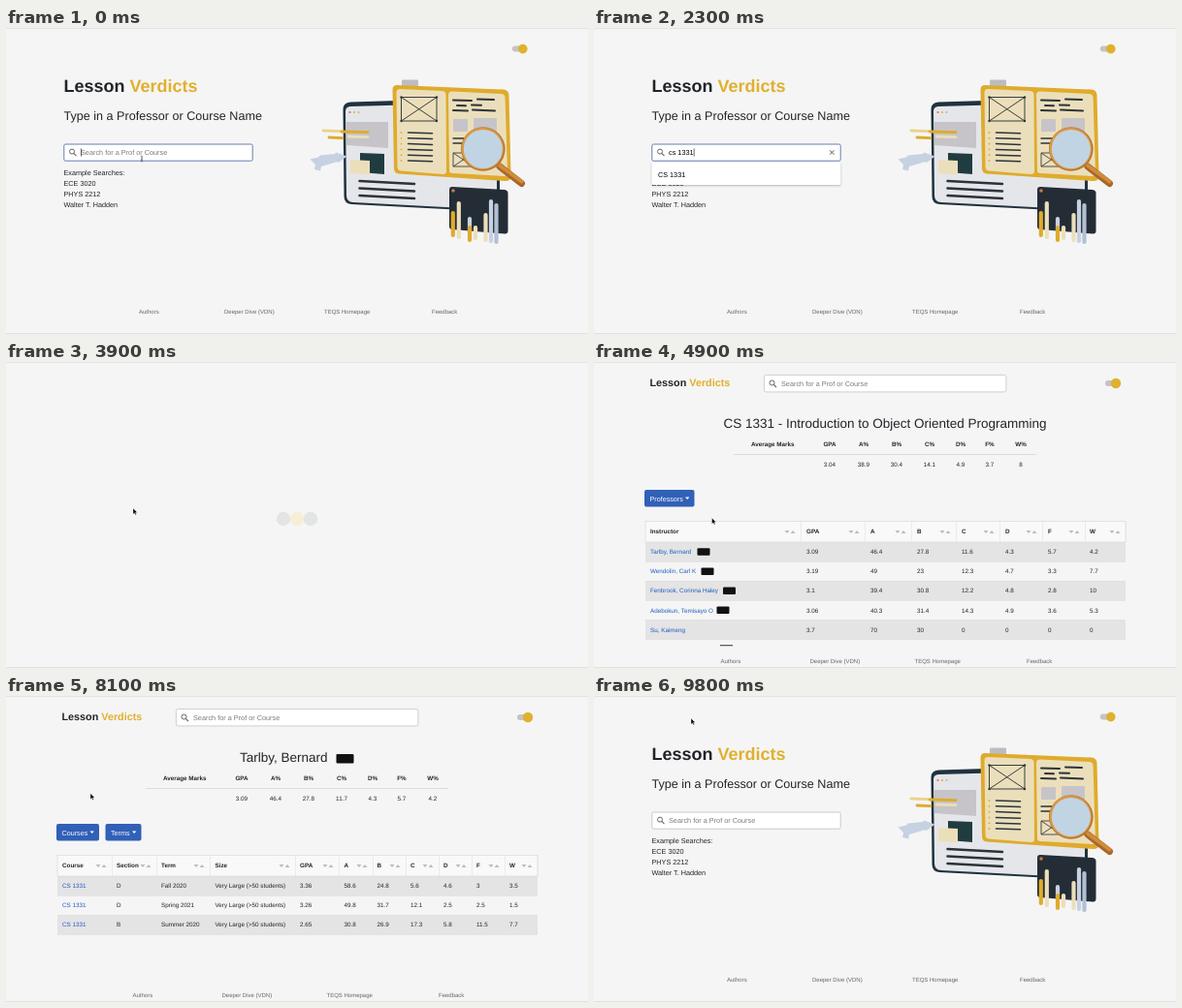
An HTML page for the animation above (9900 ms loop, 600 px wide and 316 px high).

```html
<!DOCTYPE html>
<html lang="en">
<head>
<meta charset="utf-8">
<title>Course search</title>
<style>
html, body { margin: 0; width: 100%; height: 100%; overflow: hidden; background: #f5f5f5; }
svg { display: block; width: 100vw; height: 100vh; }
text { font-family: "Liberation Sans", Arial, sans-serif; fill: #212529; text-rendering: geometricPrecision; white-space: pre; }
.bold { font-weight: 700; }
.gold { fill: #e0b02e; }
.link { fill: #1f5fbf; }
.hint { fill: #7b7b7b; }
.foot { fill: #666; }
.white { fill: #fff; }
.black { fill: #000; }
.mid { text-anchor: middle; }
#menu { filter: drop-shadow(0 1px 1px rgba(0, 0, 0, .25)); }
</style>
</head>
<body>
<svg viewBox="0 0 600 316" id="stage"></svg>
<script>
const LOOP = 9900;
const BRAND = 'Lesson <tspan class="gold">Verdicts</tspan>';
const HINT = 'Search for a Prof or Course';
const TEACHER = 'Tarlby, Bernard';

// Shape helpers; text is placed by its vertical centre
const text = (x, y, size, str, cls = '', more = '') =>
  `<text x="${x}" y="${y + size * .36}" font-size="${size}" class="${cls}" ${more}>${str}</text>`;
const rect = (x, y, w, h, fill, r = 0, more = '') =>
  `<rect x="${x}" y="${y}" width="${w}" height="${h}" rx="${r}" fill="${fill}" ${more}/>`;
const path = (d, fill, more = '') => `<path d="${d}" fill="${fill}" ${more}/>`;
const line = (d, color, w, cap = 'butt') =>
  path(d, 'none', `stroke="${color}" stroke-width="${w}" stroke-linecap="${cap}" stroke-linejoin="round"`);
const dot = (x, y, r, fill) => `<circle cx="${x}" cy="${y}" r="${r}" fill="${fill}"/>`;
const group = (id, body) => `<g id="${id}">${body}</g>`;

const toggle = (x, y, r) => rect(x - 11, y - 3, 14, 6, '#c4c4c4', 3) + dot(x, y, r, '#e0b02e');
const lens = (x, y) =>
  `<circle cx="${x}" cy="${y}" r="2.5" fill="none" stroke="#666" stroke-width="1"/>` +
  line(`M${x + 1.8} ${y + 1.8}l2.7 2.7`, '#666', 1.1);
const footer = (y, xs) => ['Authors', 'Deeper Dive (VDN)', 'TEQS Homepage', 'Feedback']
  .map((s, i) => text(xs[i], y, 6, s, 'foot')).join('');

function bookArt() {
  const navy = '#20323f', cream = '#ebdfbb', gold = '#dfab2c', grey = '#c6c4c9', blue = '#c6d1e2';
  const ink = (d, w = 1.8) => line(d, '#2b333b', w, 'round');
  const crossBox = (x, y, w, h, lw) =>
    line(`M${x} ${y}h${w}v${h}h${-w}zl${w} ${h}m0 ${-h}l${-w} ${h}`, '#3b3d40', lw);
  let s = '';
  // browser window
  s += path('M347.5 84Q347.5 77 355 76.5L500 72Q509 72 509 80V183Q509 190 502 189.5L356 182Q348.5 181 348.5 174Z', navy);
  s += path('M350 86Q350 81.5 355 81L500 77Q506 77 506 83V181Q506 188 500 187.5L358 180Q351 179.5 351 173Z', '#e5e6ea');
  s += dot(354.5, 87, 1.1, '#dc6b55') + dot(359, 87, 1.1, '#e5b437') + dot(363.5, 87, 1.1, '#b9c07c');
  s += path('M351 97L394 97V124L351 121Z', grey);
  [[327, 345, 106, '#ecd28a'], [333, 347, 113, gold], [346, 373, 107, gold], [353, 373, 112, cream]]
    .forEach(([a, b, y, c]) => s += line(`M${a} ${y}L${b} ${y + .6}`, c, 2.8, 'round'));
  s += path('M313.5 135.5L322 133.5L324 131.5L339 130L340 128.5L351.5 132.5L342 139.5L341.5 138L325 143L324 147.5L318 146L319 141Z', blue);
  s += path('M365 129L390 130V151L365 149Z', '#203c40') + path('M355 136L375 137V151.5L355 150Z', cream);
  [158, 165.5, 173].forEach(y => s += ink(`M364.5 ${y}L421 ${y + 3}`, 2.5));
  // open notebook
  s += rect(408, 53.5, 17, 12, '#bdbcc1', 1);
  s += path('M398.5 64Q398.5 59 403 59L513 63.5Q518 64 518.5 69L520.5 152Q521 158.5 514 158L405 150.5Q400 150 400 145Z', gold);
  s += path('M402.5 67Q402.5 63 406 63L450 65Q453.5 65.5 453.5 69L454 149Q453 151.5 450 151L407 147.5Q403.5 147 403.5 143Z', cream);
  s += path('M456 69Q456 65.500 460 65.5L510 68Q514.5 68 514.5 72L517 149Q517 153.5 513 153L460 150Q457 150 457 147Z', cream);
  s += crossBox(407.5, 71.5, 36.5, 24.5, 1);
  for (const x of [407.5, 444]) for (const y of [71.5, 96]) s += dot(x, y, 1.2, '#333');
  for (let y = 108; y < 138; y += 5.8) s += dot(407.5, y, .9, gold) + ink(`M414.5 ${y}L439.5 ${y + .8}`, 1.5);
  ['M461 74.5L480 75', 'M486 73.5L503 74', 'M465 80L474 80.3', 'M480 79.5L490 79.800', 'M461 85L476 85.5', 'M481 84.5L504 85.5']
    .forEach(d => s += ink(d, 2));
  s += rect(461, 94, 15, 13, grey, 1) + rect(482, 93, 24, 19, grey, 1);
  s += ink('M461 114h13M461 119h10', 1.4) + crossBox(461, 129, 21, 14, .9);
  // magnifier
  s += line('M509 143L531.5 160.5', '#a8672a', 7, 'round') + line('M509 142L531.5 158.5', '#d08c3c', 4, 'round');
  s += dot(491.8, 125, 22.8, '#b8752f') + dot(491.3, 124.5, 21.7, '#d79a49') + dot(491.8, 125, 20, '#c1d4e4');
  // chart card
  s += path('M457 167Q457 164 460 164L514 167Q517.5 167.5 517.5 170.5V210Q517 213 514 212.5L460 208Q457 207.5 457 205Z', '#242c36');
  s += dot(461, 168, 1.8, '#c47b48');
  [[460.8, 191, 214, gold], [466.8, 181, 216, cream], [478, 197, 210, blue], [478, 206, 219, gold],
   [484, 206, 217, cream], [494.5, 193, 219, cream], [500, 179, 220, blue], [505.5, 183, 221, '#b2c0d4']]
    .forEach(([x, a, b, c]) => s += line(`M${x} ${a}L${x} ${b}`, c, 4.2, 'round'));
  return s;
}

const homePage = () =>
  toggle(532.8, 21.6, 4.8) + text(59.5, 60, 18, BRAND, 'bold') +
  text(59.5, 90.4, 12.6, 'Type in a Professor or Course Name') +
  '<rect id="field" x="59.8" y="120" width="194.4" height="17.2" rx="1.5" fill="#fff" stroke-width=".9"/>' + lens(68, 127.6) +
  text(77, 128.3, 7.3, '', '', 'id="query"') + rect(77.3, 124.5, .7, 8, '#222', 0, 'id="caret"') +
  group('clear', line('M243 126.3l4.4 4.4m0-4.4l-4.4 4.4', '#555', 1)) +
  ['Example Searches:', 'ECE 3020', 'PHYS 2212', 'Walter T. Hadden']
    .map((s, i) => text(59.5, 149.5 + i * 10.9, 7.25, s)).join('') +
  footer(293.2, [137, 225, 328, 439]) + bookArt() + group('menu', '');

const loadPage = () => [286, 300, 314].map((x, i) =>
  `<circle cx="${x}" cy="162" class="pulse" fill="${i === 1 ? '#ffc107' : '#6c757d'}"/>`).join('');

const button = (x, w, label) => rect(x, 132, w, 17.5, '#3160b7', 2) +
  text(x + 5.5, 141, 7.2, label, 'white') + path(`M${x + w - 9.5} 139.5h4.4l-2.2 2.4z`, '#fff');

function averages(marks) {
  const xs = [243, 278, 312, 346, 378, 408, 440];
  const heads = ['GPA', 'A%', 'B%', 'C%', 'D%', 'F%', 'W%'];
  return text(162, 84.5, 6.3, 'Average Marks', 'bold') + rect(144, 95, 312, .8, '#d6d6d6') +
    xs.map((x, i) => text(x, 84.5, 6.3, heads[i], 'bold mid') + text(x, 105.5, 6.3, marks[i], 'mid')).join('');
}

function grid(heads, xs, rights, rows) {
  let s = rect(53, 164.5, 495, 21.5, '#f9f9f9', 0, 'stroke="#dedede" stroke-width=".8"');
  heads.forEach((h, i) => {
    const r = rights[i];
    s += text(xs[i], 175, 6.3, h, 'bold') + rect(r, 165, .6, 21, '#e2e2e2') +
      path(`M${r - 16.5} 174h5l-2.5 3zM${r - 10.5} 177h5l-2.5-3z`, '#bcbcbc');
  });
  rows.forEach((row, n) => {
    const y = 186 + n * 20.1;
    s += rect(53, y, 495, 20.1, n % 2 ? '#f5f5f5' : '#e4e4e4') + rect(53, y, 495, .6, '#dcdcdc');
    row.forEach((v, i) => s += text(xs[i], y + 10, 6.3, v, i ? '' : 'link'));
  });
  return s;
}

const topBar = () => text(57.5, 21, 10.8, BRAND, 'bold') +
  rect(175.4, 13.4, 249.5, 17.5, '#fff', 2, 'stroke="#c4c4c4" stroke-width=".8"') +
  lens(183.5, 21.5) + text(193, 22.3, 7.3, HINT, 'hint') + toggle(538, 22, 5.2);
const bottomBar = () => footer(309, [130.5, 222.5, 330.5, 446]);
const badge = (x, y, w = 13, h = 7.5) => rect(x, y, w, h, '#111', 1);

const coursePage = () => topBar() +
  text(300, 63.3, 13.5, 'CS 1331 - Introduction to Object Oriented Programming', 'mid') +
  averages([3.04, 38.9, 30.4, 14.1, 4.9, 3.7, 8]) + button(52, 51.5, 'Professors') +
  grid(['Instructor', 'GPA', 'A', 'B', 'C', 'D', 'F', 'W'],
    [58, 219, 285, 333, 379, 424, 468, 511], [213, 279, 327, 373, 418, 462, 506, 548], [
      [TEACHER, 3.09, 46.4, 27.8, 11.6, 4.3, 5.7, 4.2],
      ['Wendolin, Carl K', 3.19, 49, 23, 12.3, 4.7, 3.3, 7.7],
      ['Fenbrook, Corinna Haley', 3.1, 39.4, 30.8, 12.2, 4.8, 2.8, 10],
      ['Adebokun, Temisayo O', 3.06, 40.3, 31.4, 14.3, 4.9, 3.6, 5.3],
      ['Su, Kaimeng', 3.7, 70, 30, 0, 0, 0, 0]]) +
  [106.5, 110.5, 133, 126.5].map((x, i) => badge(x, 192.3 + i * 20.1)).join('') +
  rect(53, 286.5, 495, .6, '#dcdcdc') + rect(130, 292.2, 13, 1, '#333') +
  group('hover', rect(58, 198.9, 43.5, .6, '#1f5fbf')) + bottomBar();

const teacherPage = () => topBar() + text(241, 63.3, 13.5, TEACHER) + badge(340.5, 60, 18, 9.5) +
  averages([3.09, 46.4, 27.8, 11.7, 4.3, 5.7, 4.2]) + button(52, 44, 'Courses') + button(102.5, 37, 'Terms') +
  grid(['Course', 'Section', 'Term', 'Size', 'GPA', 'A', 'B', 'C', 'D', 'F', 'W'],
    [58, 114, 160, 215.5, 303, 348.5, 382.5, 417, 451, 485, 519],
    [109, 155, 210, 298, 343, 378, 412, 446, 480, 514, 548],
    [['D', 'Fall 2020', 3.36, 58.6, 24.8, 5.6, 4.6, 3, 3.5],
     ['D', 'Spring 2021', 3.26, 49.8, 31.7, 12.1, 2.5, 2.5, 1.5],
     ['B', 'Summer 2020', 2.65, 30.8, 26.9, 17.3, 5.8, 11.5, 7.7]]
      .map(([sec, term, ...marks]) => ['CS 1331', sec, term, 'Very Large (&gt;50 students)', ...marks])) +
  rect(53, 246.3, 495, .6, '#dcdcdc') + bottomBar();

const POINTERS = {
  arrow: path('M0 0V6.2L1.5 4.9L2.5 7L3.5 6.5L2.5 4.5H4.4Z', '#000', 'stroke="#fff" stroke-width=".4"'),
  hand: path('M-.6 0Q0-.6.6 0V2.2L2.6 2.7Q3.2 3 3 4L2.4 6H-1L-2.5 3.6Q-2.3 2.6-1.4 3.2L-.6 3.9Z', '#fff', 'stroke="#111" stroke-width=".6"'),
  beam: line('M-1.3-3Q0-3 0-2V2Q0 3-1.3 3M1.3-3Q0-3 0-2V2Q0 3 1.3 3M-.8 1h1.6', '#444', .5)
};

const stage = document.getElementById('stage');
stage.innerHTML = group('home', homePage()) + group('load', loadPage()) +
  group('course', coursePage()) + group('teacher', teacherPage()) +
  rect(0, 0, 600, 1, '#e4e4e4') + rect(0, 315, 600, 1, '#e0e0e0') +
  group('pointer', Object.entries(POINTERS).map(([k, v]) => group(k, v)).join(''));

const $ = id => document.getElementById(id);
const show = (id, on) => { $(id).style.display = on ? '' : 'none'; };
const lastAt = (list, t) => list.filter(e => e[0] <= t).pop();

const SCENES = [[0, 'home'], [3200, 'load'], [4000, 'course'], [6500, 'load'], [7200, 'teacher'], [8700, 'home']];
const KEYS = [[0, ''], [1100, 'c'], [1200, 'cs'], [1400, 'cs '], [1500, 'cs 1'], [1800, 'cs 13'], [2100, 'cs 133'], [2300, 'cs 1331']];
const SHAPES = [[0, 'beam'], [1100, ''], [2600, 'beam'], [2800, 'hand'], [3200, 'arrow'], [8300, 'hand'], [8700, 'arrow']];
const MOVES = [[0, 140, 135], [2600, 140, 135], [2900, 131, 151], [4700, 131, 151], [5100, 112, 171], [5600, 112, 171],
  [6100, 91.5, 195], [7300, 91.5, 195], [7800, 84, 150], [8100, 87, 100.5], [8300, 100, 23], [LOOP, 100, 23]];
const COURSES = [1050, 1301, 1315, 1316, 1331, 1332, 1371, 1372].map(n => 'CS ' + n);

function pointerAt(t) {
  const i = MOVES.findIndex(m => m[0] > t);
  const [t0, x0, y0] = MOVES[i - 1], [t1, x1, y1] = MOVES[i];
  const k = (t - t0) / (t1 - t0);
  return [x0 + (x1 - x0) * k, y0 + (y1 - y0) * k];
}

function menu(query, active) {
  if (!query) return '';
  const top = 138.8, pad = 3.6, pitch = 16.1;
  const items = COURSES.filter(c => c.toLowerCase().startsWith(query));
  return rect(59.5, top, 194.7, Math.min(131.2, items.length * pitch + pad * 2), '#fff', 1) +
    (active ? rect(59.5, top + pad, 194.7, pitch, '#e0e0e0') : '') +
    items.map((c, i) => text(66, 151 + i * pitch, 7.25, c, 'black')).join('');
}

function drawHome(t) {
  const early = t < 5000;
  const [since, query] = early ? lastAt(KEYS, t) : [0, ''];
  $('query').textContent = query || HINT;
  $('query').setAttribute('class', query ? 'black' : 'hint');
  $('field').setAttribute('stroke', early ? '#5570ab' : '#c4c4c4');
  show('caret', early && (t - since) % 1000 < 500);
  const width = query ? $('query').getComputedTextLength() : 0;
  $('caret').setAttribute('x', 77.2 + width);
  show('clear', query);
  $('menu').innerHTML = menu(query, t >= 2900);
}

function drawLoad(age) {
  const p = age % 750 / 750;
  document.querySelectorAll('.pulse').forEach(c => {
    c.setAttribute('r', 7.2 * Math.min(1, p * 2));
    c.setAttribute('opacity', 1 - Math.abs(p * 2 - 1));
  });
}

const begin = performance.now();
function frame() {
  const t = Math.floor((performance.now() - begin) % LOOP / 100) * 100;
  const [start, scene] = lastAt(SCENES, t);
  for (const id of ['home', 'load', 'course', 'teacher']) show(id, id === scene);
  if (scene === 'home') drawHome(t);
  if (scene === 'load') drawLoad(t - start);
  show('hover', t >= 6000);
  const shape = lastAt(SHAPES, t)[1];
  for (const id in POINTERS) show(id, id === shape);
  $('pointer').setAttribute('transform', `translate(${pointerAt(t)})`);
  requestAnimationFrame(frame);
}
frame();
</script>
</body>
</html>
```
